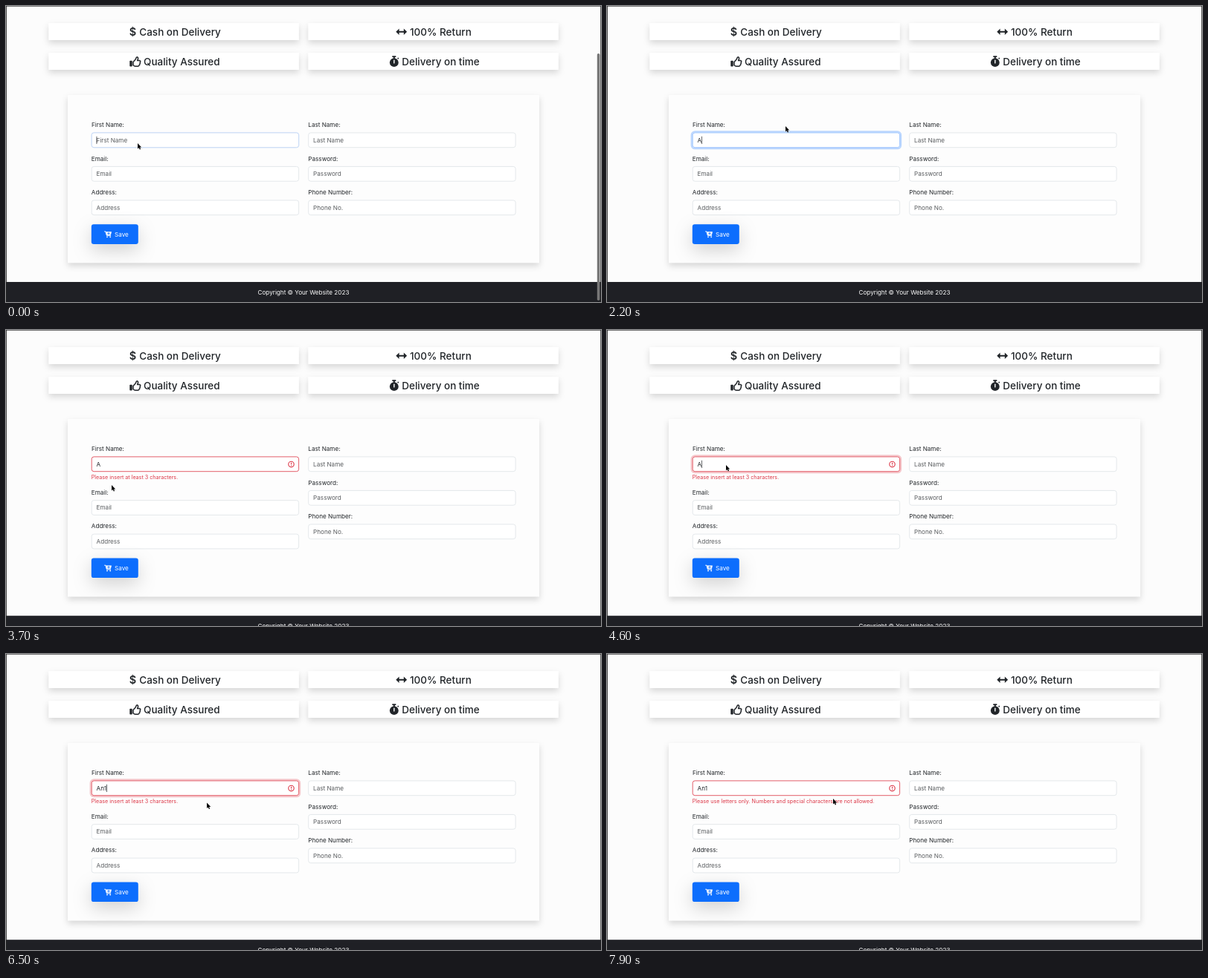
Write an HTML page that moves like this. It is 800 px wide and 399 px high and loops after 8000 ms.

```html
<!DOCTYPE html>
<html lang="en">
<head>
<meta charset="utf-8">
<title>Form validation</title>
<style>
  html, body { margin: 0; height: 100%; overflow: hidden; background: #fcfcfc; }
  svg { display: block; width: 100vw; height: 100vh; }
  text { font: 8.15px Inter, sans-serif; fill: #212529; white-space: pre; }
  .title { font-size: 13.5px; font-weight: 500; }
  .hint { fill: #595c5f; }
  .light { fill: #fff; }
  #error { font-size: 7.15px; fill: #dc3545; }
  .card { fill: #fff; filter: drop-shadow(0 4px 4.3px rgba(0, 0, 0, .15)); }
  .form { fill: #fdfdfd; }
  .field { fill: #fff; stroke: #dee2e6; stroke-width: .8; }
  .icon { fill: #212529; }
  .button { fill: #0d6efd; filter: drop-shadow(0 8px 12px rgba(0, 0, 0, .175)); }
</style>
</head>
<body>
<svg id="stage" viewBox="0 0 800 399" preserveAspectRatio="none"></svg>
<script>
const LOOP = 8000, SHIFT = 13.2;
const BLUR_1 = 2250, FOCUS_2 = 4450, BLUR_2 = 6600;
const stage = document.getElementById('stage');

const rect = (x, y, w, h, attrs) => `<rect x="${x}" y="${y}" width="${w}" height="${h}" ${attrs}/>`;
const text = (x, y, str, attrs = '') => `<text x="${x}" y="${y}" ${attrs}>${str}</text>`;
const title = (cardX, cardY, x, str) =>
  rect(cardX, cardY, 336.5, 23, 'class="card"') + text(x, cardY + 16.8, str, 'class="title"');
const label = (x, y, str) => text(x, y - 7.5, str);
const box = (x, y, attrs = '') => rect(x + .4, y + .4, 278.4, 19.8, `rx="3" class="field" ${attrs}`);
const field = (x, y, name, hint) =>
  label(x, y, name) + box(x, y) + text(x + 6.8, y + 13.3, hint, 'class="hint"');

stage.innerHTML = `
  ${rect(0, 0, 800, 399, 'fill="#fcfcfc"')}
  ${title(57.3, 23, 179.3, 'Cash on Delivery')}
  ${title(406.3, 23, 543, '100% Return')}
  ${title(57.3, 63, 185, 'Quality Assured')}
  ${title(406.3, 63, 532.3, 'Delivery on time')}
  <g class="icon">
    <text x="165.8" y="39.8" style="font-size:14.5px;font-weight:600">$</text>
    <path d="M524.3 34.8l4.3-4.2v3.2h6.2v-3.2l4.3 4.2-4.3 4.2v-3.2h-6.2v3.2z"/>
    <rect x="166.3" y="73.8" width="3.4" height="7.8" rx=".8"/>
    <path fill="none" stroke="#212529" stroke-width="1.5" stroke-linejoin="round"
      d="M171 79.8V75.5L174.3 71.8C174.8 69.5 176 68.2 177 69C178 70 177.5 72 176.6 73.6H180q1.4.7.2 2.2 .8 1.2-.4 2.2 .4 1.4-.8 1.8 0 1.4-1.5 1.5H174q-1.7-.2-3-1.5z"/>
    <circle cx="521.8" cy="76.2" r="5.9"/>
    <path d="M519.3 67.3h5v1.8h-1.5v2h-2v-2h-1.5zM526 70.5l1.2-1.1 1.2 1.2-1.2 1.2z"/>
    <path stroke="#fff" stroke-width="1.4" stroke-linecap="round" d="M521.8 73.3v3.6"/>
  </g>
  <rect id="form" x="83" y="120" width="634" class="card form"/>
  ${label(115, 170.5, 'First Name:')}
  <rect id="ring" fill="none"/>
  ${box(114.8, 170.5, 'id="first"')}
  ${text(121.6, 183.8, '', 'id="value"')}
  <rect id="caret" y="175.8" width=".7" height="10.2" fill="#212529"/>
  <g id="invalid">
    <g fill="none" stroke="#dc3545" stroke-width="1.1">
      <circle cx="383.5" cy="180.9" r="3.7"/>
      <path d="M383.5 178.7v2.6m0 .8v1"/>
    </g>
    ${text(114.8, 201, '', 'id="error"')}
  </g>
  ${field(406.3, 170.5, 'Last Name:', 'Last Name')}
  ${field(406.3, 216, 'Password:', 'Password')}
  ${field(406.3, 261.5, 'Phone Number:', 'Phone No.')}
  <g id="lower">
    ${field(114.8, 216, 'Email:', 'Email')}
    ${field(114.8, 261.5, 'Address:', 'Address')}
    ${rect(114.8, 294.3, 63, 26.6, 'rx="3.2" class="button"')}
    <g fill="none" stroke="#fff" stroke-linecap="round" stroke-linejoin="round">
      <path d="M132.6 304h1.4l1.5 5.6h5.2"/>
      <path fill="#fff" stroke-width=".6" d="M134.6 304.6h7l-1 3.8h-5.1z"/>
      <path stroke="#0d6efd" stroke-width=".8" d="M138 305.2v2.6m-1.3-1.3h2.6"/>
    </g>
    <g fill="#fff"><circle cx="136" cy="311.3" r=".9"/><circle cx="140.2" cy="311.3" r=".9"/></g>
    ${text(146, 310.8, 'Save', 'class="light"')}
  </g>
  <g id="footer">
    ${rect(0, 372, 800, 40, 'fill="#1f2025"')}
    ${text(400, 389.2, 'Copyright © Your Website 2023', 'class="light" text-anchor="middle"')}
  </g>
  <rect id="scrollbar" x="794.8" y="64" width="3.6" height="333" rx="1.8" fill="#777"/>
  <path fill="none" stroke="#222" d="M0 .1H800M.3 0V399M799.8 0V399"/>
  <path id="cursor" d="M0 0V7.4L1.7 5.9 2.8 8.5 4.1 7.9 3 5.4H5.2Z"
    fill="#000" stroke="#fff" stroke-width=".6" paint-order="stroke"/>`;

const el = Object.fromEntries([...stage.querySelectorAll('[id]')].map(node => [node.id, node]));
const set = (node, attrs) => Object.entries(attrs).forEach(([k, v]) => node.setAttribute(k, v));
const show = (node, on) => set(node, { visibility: on ? 'visible' : 'hidden' });
const clamp = v => Math.min(1, Math.max(0, v));
const smooth = v => v * v * (3 - 2 * v);
const ramp = (t, start, length = 150) => smooth(clamp((t - start) / length));
const mix = (a, b, p) => a.map((v, i) => v + (b[i] - v) * p);
const rgb = c => `rgb(${c.map(Math.round)})`;

const GREY = [222, 226, 230], BLUE = [134, 183, 254], RED = [220, 53, 69];
const caretOn = [[0, 400], [700, 1200], [1700, BLUR_1], [FOCUS_2, 4900], [5100, 5400], [6000, BLUR_2]];
const within = (t, [from, to]) => t >= from && t < to;

// time, x, y of the pointer tip
const pointer = [
  [0, 177, 185], [700, 179, 186], [1000, 182, 185.5], [1850, 182, 185.5],
  [2250, 242.5, 161], [2400, 242.5, 161], [2700, 232, 203], [3300, 120, 204],
  [3500, 112, 208], [3700, 142, 209], [4100, 215, 203], [4300, 175, 200],
  [4450, 160, 182], [6200, 160, 182], [6600, 290, 204], [6850, 290, 204],
  [7200, 190, 202], [7580, 94, 218], [7900, 304, 195], [8000, 318, 194]
];
function pointerAt(t) {
  const i = pointer.findIndex(k => k[0] > t);
  const [a, b] = [pointer[i - 1], pointer[i]];
  return mix(a, b, smooth((t - a[0]) / (b[0] - a[0]))).slice(1);
}

function draw(t) {
  const invalid = t >= BLUR_1;
  const shift = invalid ? SHIFT : 0;
  const typed = t < 700 ? '' : t < 5100 ? 'A' : t < 6100 ? 'An' : 'An1';

  set(el.lower, { transform: `translate(0 ${shift})` });
  set(el.footer, { transform: `translate(0 ${shift})` });
  set(el.form, { height: 226.3 + shift });
  show(el.invalid, invalid);
  el.error.textContent = t < BLUR_2 ? 'Please insert at least 3 characters.'
    : 'Please use letters only. Numbers and special characters are not allowed.';

  el.value.textContent = typed || 'First Name';
  set(el.value, { class: typed ? '' : 'hint' });
  show(el.caret, caretOn.some(span => within(t, span)));
  set(el.caret, { x: 121.6 + (typed ? el.value.getComputedTextLength() : 0) });

  const border = mix(mix(GREY, BLUE, ramp(t, -70)), RED, ramp(t, BLUR_1));
  set(el.first, { style: `stroke:${rgb(border)}` });
  const focus = ramp(t, -30) - ramp(t, BLUR_1) + ramp(t, FOCUS_2) - ramp(t, BLUR_2);
  const w = 2.2 * focus;
  set(el.ring, {
    x: 114.8 - w / 2, y: 170.5 - w / 2, width: 279.2 + w, height: 20.6 + w, rx: 3.4 + w / 2,
    stroke: t < FOCUS_2 ? '#0d6efd' : '#dc3545', 'stroke-opacity': .27, 'stroke-width': w
  });

  set(el.scrollbar, { opacity: 1 - ramp(t, 100, 350) });
  const [x, y] = pointerAt(t);
  set(el.cursor, { transform: `translate(${x} ${y})` });
  show(el.cursor, !within(t, [5100, 6200]));
}

const start = performance.now();
function tick() {
  draw((performance.now() - start) % LOOP);
  requestAnimationFrame(tick);
}
tick();
</script>
</body>
</html>
```
